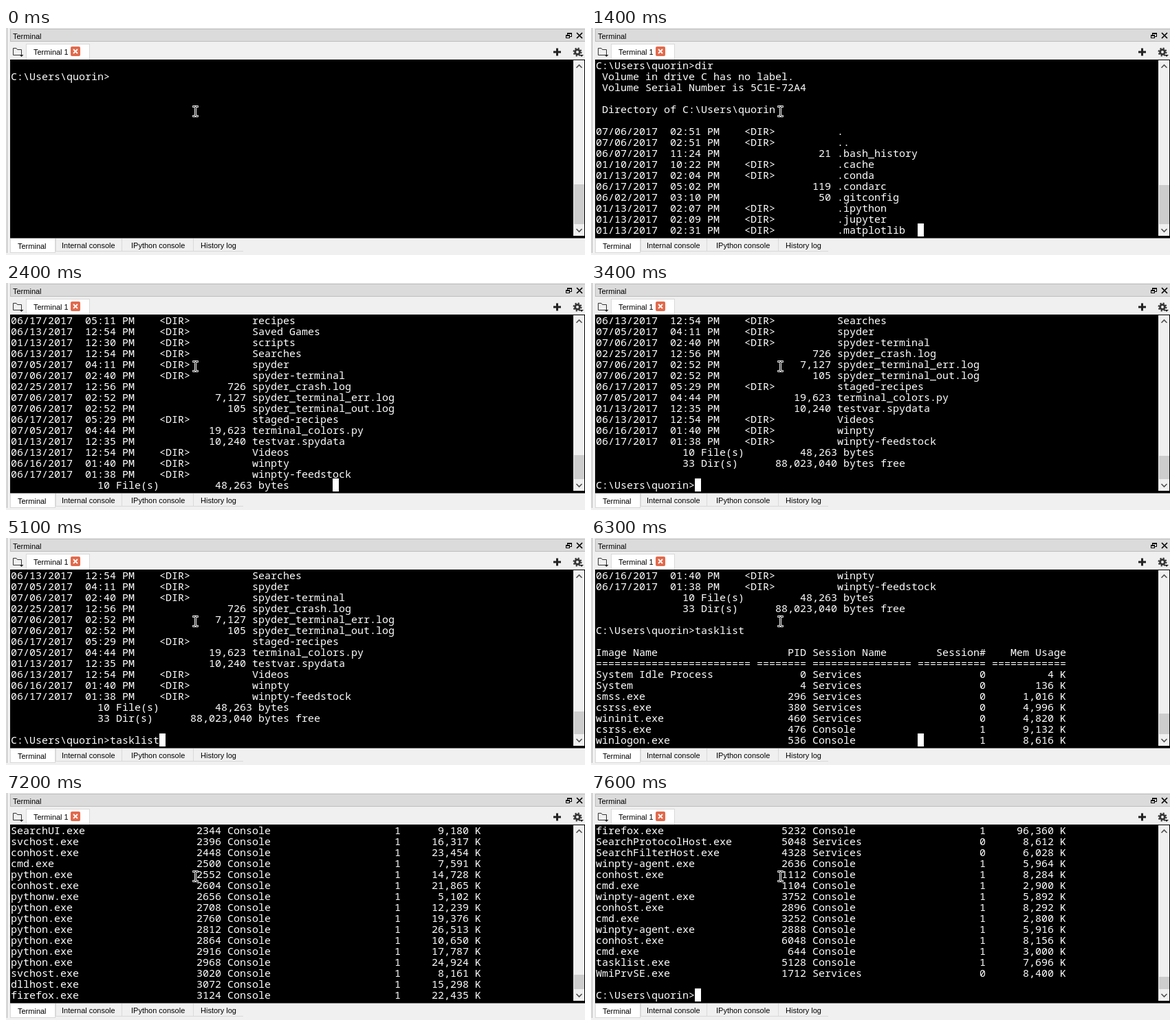
Recreate the animation shown at these times as an HTML page. Size 842 px wide and 331 px high, loop 8 s.

```html
<!DOCTYPE html>
<html lang="en">
<head>
<meta charset="utf-8">
<title>Terminal</title>
<style>
html, body { margin: 0; width: 100%; height: 100%; overflow: hidden; background: #f0f0f0; }
svg, pre, #caret { position: absolute; left: 0; top: 0; }
svg text { font: 11px "Liberation Sans", Arial, sans-serif; fill: #000; }
pre { margin: 0; left: 7px; top: 46px; color: #fff; font: 15px/16px "Noto Sans Mono", monospace; font-variant-ligatures: none; }
#caret { width: 9px; height: 19px; background: #fff; }
</style>
</head>
<body>
<svg width="842" height="331" shape-rendering="crispEdges">
  <path d="M1.5 0V328" stroke="#b4b4b4"/>
  <rect x="6.5" y="1.5" width="840" height="18" fill="#dbdbdb" stroke="#bdbdbd"/>
  <text x="10" y="16">Terminal</text>
  <path d="M816.5 10V7.5H822.5V12.5H820M816 8.5H822M814.5 10.5H819.5V14.5H814.5ZM814 11.5H820" fill="none" stroke="#000"/>
  <path d="M830 7L838 15M838 7L830 15" stroke="#000" stroke-width="1.7" shape-rendering="auto"/>

  <path d="M29.5 46V23.5H121.5V46" fill="#fff" stroke="#d9d9d9"/>
  <text x="40" y="39">Terminal 1</text>
  <g shape-rendering="auto" fill="none">
    <path d="M10.5 39.500V29.500H15L16.500 31.500H22.500V39.500Z" stroke="#333"/>
    <path d="M19.500 39H25.500L22.500 42Z" fill="#222"/>
    <rect x="94" y="27" width="14" height="14" rx="2" fill="#e2694b"/>
    <path d="M98 31L104 37M104 31L98 37" stroke="#fff" stroke-width="1.800"/>
    <path d="M796 35H807M801.500 29.500V40.500" stroke="#222" stroke-width="3"/>
    <circle cx="831" cy="35" r="3.400" stroke="#333" stroke-width="2.800"/>
    <circle cx="831" cy="35" r="5.500" stroke="#333" stroke-width="2" stroke-dasharray="2.160"/>
    <path d="M834 39H840L837 42Z" fill="#222"/>
  </g>

  <rect x="6" y="46" width="836" height="260"/>
  <rect x="825" y="47" width="16" height="256" fill="#f0f0f0"/>
  <rect id="thumb" x="826" width="15" fill="#cdcdcd"/>
  <path d="M829.5 58L833.5 54L837.5 58M829.5 293L833.5 297L837.5 293" fill="none" stroke="#505050" stroke-width="1.6" shape-rendering="auto"/>

  <path d="M72.500 307V325.500H345M168.500 307V325M272.500 307V325" fill="none" stroke="#d9d9d9"/>
  <path d="M6.500 306.500V327.500H71.500V306.500" fill="#fff" stroke="#d9d9d9"/>
  <path d="M6 306.500H842" stroke="#777"/>
  <text x="17" y="322">Terminal</text>
  <text x="81" y="321">Internal console</text>
  <text x="182" y="321">IPython console</text>
  <text x="283" y="321">History log</text>
</svg>
<pre></pre>
<div id="caret"></div>
<svg width="842" height="331" fill="none">
  <path id="beam" d="M271.500 114.500H274.500L275.500 115.500L276.500 114.500H279.500M275.500 115V128M271.500 128.500H274.500L275.500 127.500L276.500 128.500H279.500" stroke="#fff" stroke-width="3"/>
  <use href="#beam"/>
  <path d="M272 114.500H274.500L275.500 115.500L276.500 114.500H279M275.500 115V128M272 128.500H274.500L275.500 127.500L276.500 128.500H279" stroke="#000"/>
</svg>
<script>
const home = 'C:\\Users\\quorin', prompt = home + '>';
const rows = s => s.trim().split('\n');

// date, time, optional size, name
const entries = rows(`
07/06/2017 02:51 .
07/06/2017 02:51 ..
06/07/2017 11:24 21 .bash_history
01/10/2017 10:22 .cache
01/13/2017 02:04 .conda
06/17/2017 05:02 119 .condarc
06/02/2017 03:10 50 .gitconfig
01/13/2017 02:07 .ipython
01/13/2017 02:09 .jupyter
01/13/2017 02:31 .matplotlib
06/07/2017 11:21 12 .node_repl_history
01/13/2017 02:06 .spyder
07/06/2017 02:41 .spyder-py3
01/10/2017 10:19 .ssh
02/17/2017 03:16 10,240 a.spydata
06/17/2017 04:55 Anaconda3
06/02/2017 06:49 autowrap
06/02/2017 03:12 build-gyp
06/13/2017 12:54 Contacts
06/13/2017 12:54 Desktop
06/13/2017 12:54 Documents
07/06/2017 02:51 Downloads
06/13/2017 12:54 Favorites
01/10/2017 10:58 HCL
06/13/2017 06:36 Links
06/13/2017 12:54 Music
06/13/2017 12:54 Pictures
06/02/2017 03:40 Projects
06/17/2017 05:11 recipes
06/13/2017 12:54 Saved Games
01/13/2017 12:30 scripts
06/13/2017 12:54 Searches
07/05/2017 04:11 spyder
07/06/2017 02:40 spyder-terminal
02/25/2017 12:56 726 spyder_crash.log
07/06/2017 02:52 7,127 spyder_terminal_err.log
07/06/2017 02:52 105 spyder_terminal_out.log
06/17/2017 05:29 staged-recipes
07/05/2017 04:44 19,623 terminal_colors.py
01/13/2017 12:35 10,240 testvar.spydata
06/13/2017 12:54 Videos
06/16/2017 01:40 winpty
06/17/2017 01:38 winpty-feedstock`).map(row => {
  const [, date, time, size, name] = row.match(/^(\S+) (\S+) (?:([\d,]+) )?(.+)$/);
  return `${date}  ${time} PM` + (size ? size.padStart(18) : '    <DIR>'.padEnd(18)) + ' ' + name;
});

const taskRow = (name, pid, session, id, mem) =>
  [name.padEnd(25), pid.padStart(8), session.padEnd(16), id.padStart(11), mem.padStart(12)].join(' ');

// name, pid, Services or Console, memory; bare names get plausible figures
const tasks = rows(`
System Idle Process 0 S 4
System 4 S 136
smss.exe 296 S 1,016
csrss.exe 380 S 4,996
wininit.exe 460 S 4,820
csrss.exe 476 C 9,132
winlogon.exe 536 C 8,616
services.exe
lsass.exe
${'svchost.exe\n'.repeat(15)}spoolsv.exe 1484 S 11,028
svchost.exe 1668 S 8,388
svchost.exe 1808 S 19,368
IpOverUsbSvc.exe 1824 S 11,140
svchost.exe 1916 S 19,128
MsMpEng.exe 1924 S 125,444
Memory Compression 2012 S 21,460
dasHost.exe 2468 S 9,964
NisSrv.exe 2704 S 11,932
sihost.exe 2436 C 19,332
svchost.exe 2288 C 17,116
taskhostw.exe 2744 C 18,276
RuntimeBroker.exe 752 C 27,956
explorer.exe 1964 C 93,596
SearchIndexer.exe 3308 S 32,484
ShellExperienceHost.exe 3472 C 72,248
SearchUI.exe
svchost.exe
conhost.exe
cmd.exe
python.exe
conhost.exe
pythonw.exe
${'python.exe\n'.repeat(6)}svchost.exe
dllhost.exe
${'firefox.exe\n'.repeat(6)}firefox.exe 5232 C 96,360
SearchProtocolHost.exe 5048 S 8,612
SearchFilterHost.exe 4328 S 6,028
winpty-agent.exe 2636 C 5,964
conhost.exe 1112 C 8,284
cmd.exe 1104 C 2,900
winpty-agent.exe 3752 C 5,892
conhost.exe 2896 C 8,292
cmd.exe 3252 C 2,800
winpty-agent.exe 2888 C 5,916
conhost.exe 6048 C 8,156
cmd.exe 644 C 3,000
tasklist.exe 5128 C 7,696
WmiPrvSE.exe 1712 S 8,400`).map((row, i) => {
  const full = /\d$/.test(row) ? row
    : `${row} ${264 + i * 52} ${i < 30 ? 'S' : 'C'} ${5 + i * 7 % 23},${100 + i * 137 % 900}`;
  const [, name, pid, kind, mem] = full.match(/^(.+) (\d+) ([SC]) (\S+)$/);
  return taskRow(name, pid, ...(kind == 'S' ? ['Services', '0'] : ['Console', '1']), mem + ' K');
});

const total = (count, label, size, unit) =>
  `${count} ${label}`.padStart(17 + label.length) + size.padStart(22 - label.length) + ' ' + unit;

const lines = [
  '', prompt, ' Volume in drive C has no label.', ' Volume Serial Number is 5C1E-72A4', '',
  ' Directory of ' + home, '', ...entries,
  total(10, 'File(s)', '48,263', 'bytes'), total(33, 'Dir(s)', '88,023,040', 'bytes free'),
  '', prompt, '',
  taskRow('Image Name', 'PID', 'Session Name', 'Session#', 'Mem Usage'),
  [25, 8, 16, 11, 12].map(n => '='.repeat(n)).join(' '),
  ...tasks, '', prompt
];
const secondPrompt = 53;

// time and index of the last printed line
const output = [[0, 1], [900, 1], [1000, 2], [1100, 9], [1200, 9], [1900, 32], [2500, 53], [5100, 53],
  [5200, 54], [5800, 54], [6100, 61], [6200, 61], [6300, 63], [6700, 86], [6800, 86], [6900, 96], [7600, 133], [8000, 133]];
const keys = [3600, 3700, 3900, 4000, 4500, 4700, 4800, 4900];
const blinkStarts = [-600, 200, 500, 1000, ...keys, 5100];

function lastLine(t) {
  const i = output.findIndex(([time]) => time > t);
  const [t0, a] = output[i - 1], [t1, b] = output[i];
  return Math.round(a + (b - a) * (t - t0) / (t1 - t0));
}

const screen = document.querySelector('pre');
const caret = document.getElementById('caret');
const thumb = document.getElementById('thumb');

function draw(t) {
  const last = lastLine(t), scroll = Math.max(0, last - 15);
  lines[1] = prompt + (t < 200 ? '' : t < 500 ? 'cls' : 'dir');
  lines[secondPrompt] = prompt + 'tasklist'.slice(0, keys.filter(k => k <= t).length);
  screen.textContent = lines.slice(scroll, last + 1).join('\n');

  const line = lines[last];
  const column = line.startsWith(prompt) ? line.length : last == 2 || last == 54 ? 0 : 52;
  const blink = t - blinkStarts.filter(s => s <= t).pop();
  caret.style.visibility = Math.floor(blink / 600) % 2 ? 'hidden' : 'visible';
  caret.style.left = 7 + column * 9 + 'px';
  caret.style.top = 45 + (last - scroll) * 16 + 'px';

  // the bar reacts to Enter just before the text moves
  const pending = t >= 5100 && t < 5200;
  const top = Math.round(286 - 3080 / (53 + scroll + pending));
  thumb.setAttribute('y', top);
  thumb.setAttribute('height', 286 - top);
}

const start = performance.now();
function tick() {
  draw(Math.floor((performance.now() - start) % 8000 / 100) * 100);
  requestAnimationFrame(tick);
}
tick();
</script>
</body>
</html>
```
